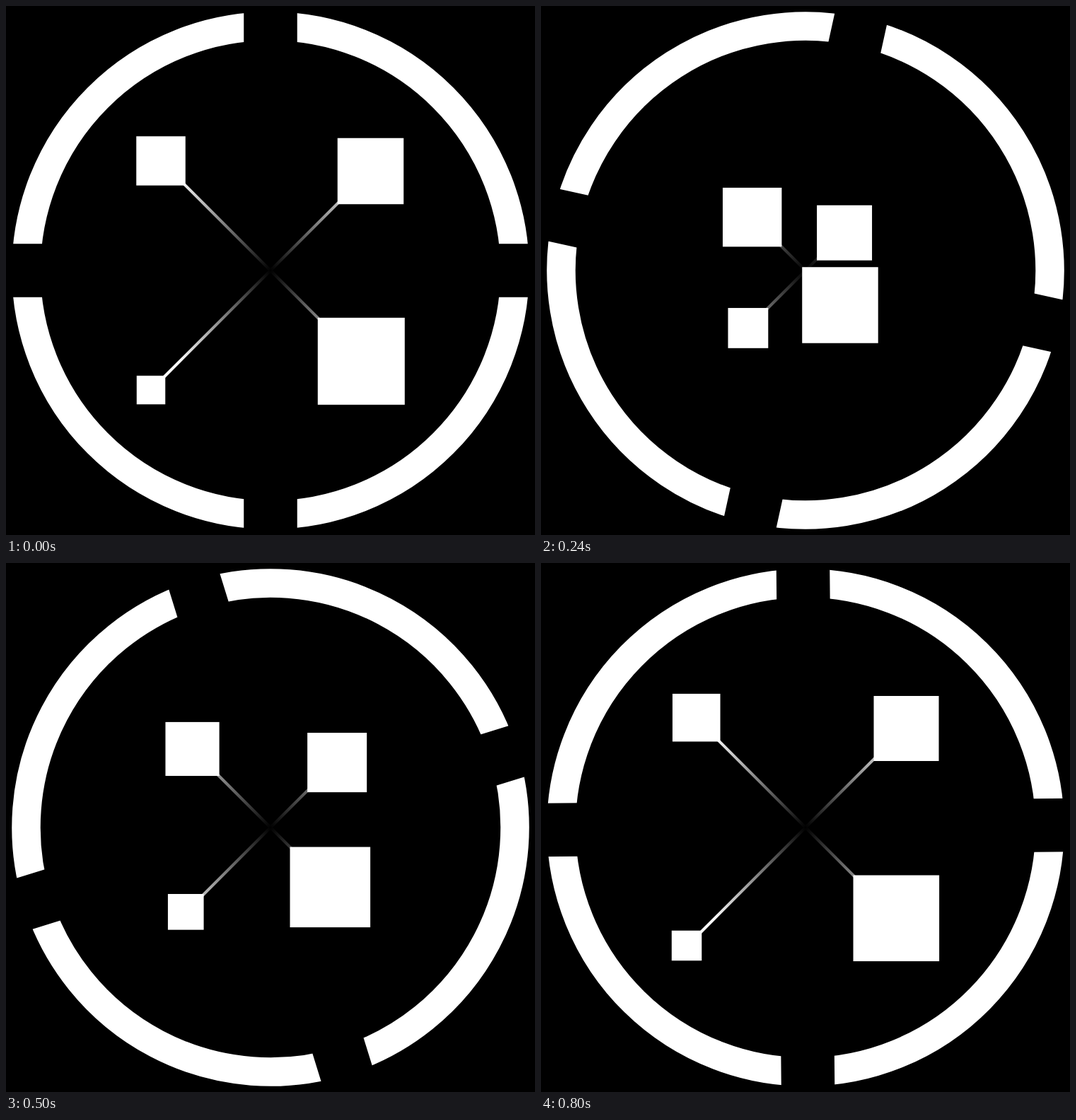
Recreate the animation shown at these times as an HTML page. Size 748 px wide and 748 px high, loop 820 ms.

```html
<!DOCTYPE html>
<html lang="en">
<head>
<meta charset="utf-8">
<title>Rotating ring with four squares</title>
<style>
  html, body { margin: 0; width: 100%; height: 100%; overflow: hidden; background: #000; }
  svg { display: block; width: 100vw; height: 100vh; }
</style>
</head>
<body>
<svg viewBox="0 0 748 748">
  <defs>
    <radialGradient id="fade" gradientUnits="userSpaceOnUse" cx="374" cy="374" r="185">
      <stop offset="0" stop-color="#000"/>
      <stop offset="1" stop-color="#fff"/>
    </radialGradient>
  </defs>
  <rect width="748" height="748" fill="#000"/>
  <g id="ring">
    <circle cx="374" cy="374" r="345.5" fill="none" stroke="#fff" stroke-width="40.5"/>
    <path d="M374 0V748M0 374H748" stroke="#000" stroke-width="75.5"/>
  </g>
  <g id="lines" stroke="url(#fade)" stroke-width="4"></g>
  <g id="boxes" fill="#fff"></g>
</svg>
<script>
const LOOP = 820, STEP = 20, MID = 374;
const START = 6, TURN = 362, REST = 614, PEAK = 1.055;

// time, angle, angular speed
const SPIN = [
  [0, 0, 0.05], [160, 54.5, 0.56], [240, 102.4, 0.48], [400, 149.2, 0.18],
  [500, 162.8, 0.1], [660, 174.8, 0.052], [800, 179.45, 0.026], [820, 180, 0.0275]
];

// centre x, centre y, size: at the start, drawn in, and at rest
const BOXES = [
  { from: [219, 219, 69.5], near: [319, 319, 87], to: [219.7, 218.7, 67.6] },
  { from: [515.5, 233.5, 93.5], near: [407, 343, 74], to: [516.5, 234, 92] },
  { from: [502.3, 502.3, 123], near: [402.7, 402.7, 103.5], to: [502.3, 502.3, 121.6] },
  { from: [205, 543, 40.5], near: [315.3, 433, 61], to: [206, 541, 42.5] }
];

const ring = document.getElementById('ring');

function add(tag, parent) {
  const el = document.createElementNS('http://www.w3.org/2000/svg', tag);
  document.getElementById(parent).appendChild(el);
  return el;
}

function set(el, attrs) {
  for (const name in attrs) el.setAttribute(name, attrs[name]);
}

for (const box of BOXES) {
  box.line = add('line', 'lines');
  box.rect = add('rect', 'boxes');
  box.sx = Math.sign(box.from[0] - MID);
  box.sy = Math.sign(box.from[1] - MID);
}

function easeInOut(x) {
  if (x <= 0) return 0;
  if (x >= 1) return 1;
  let lo = 0, hi = 1, s = 0.5;
  for (let i = 0; i < 24; i++) {
    s = (lo + hi) / 2;
    const q = 1 - s;
    const at = 1.26 * s * q * q + 1.74 * s * s * q + s * s * s;
    if (at < x) lo = s; else hi = s;
  }
  return s * s * (3 - 2 * s);
}

function angleAt(t) {
  let i = 0;
  while (t > SPIN[i + 1][0]) i++;
  const [t0, a0, v0] = SPIN[i], [t1, a1, v1] = SPIN[i + 1];
  const d = t1 - t0, s = (t - t0) / d, q = 1 - s;
  return a0 * q * q * (1 + 2 * s) + v0 * d * s * q * q
       + a1 * s * s * (3 - 2 * s) - v1 * d * s * s * q;
}

function pullAt(t) {
  return PEAK * (t < TURN
    ? easeInOut((t - START) / (TURN - START))
    : 1 - easeInOut((t - TURN) / (REST - TURN)));
}

function placeBox(box, t) {
  const pull = pullAt(t);
  const base = t < TURN ? box.from : box.to;
  const [x, y, size] = base.map((b, i) => b + (box.near[i] - b) * pull);
  set(box.rect, { x: x - size / 2, y: y - size / 2, width: size, height: size });

  // exact diagonal that ends underneath its square
  const reach = (Math.abs(x - MID) + Math.abs(y - MID)) / 2;
  set(box.line, { x1: MID, y1: MID, x2: MID + box.sx * reach, y2: MID + box.sy * reach });
}

function render(ms) {
  const t = Math.floor((ms % LOOP) / STEP) * STEP;
  ring.setAttribute('transform', `rotate(${angleAt(t)} ${MID} ${MID})`);
  for (const box of BOXES) placeBox(box, t);
}

let origin = null;
function tick(now) {
  if (origin === null) origin = now;
  render(Math.max(0, now - origin));
  requestAnimationFrame(tick);
}
render(0);
requestAnimationFrame(tick);
</script>
</body>
</html>
```
